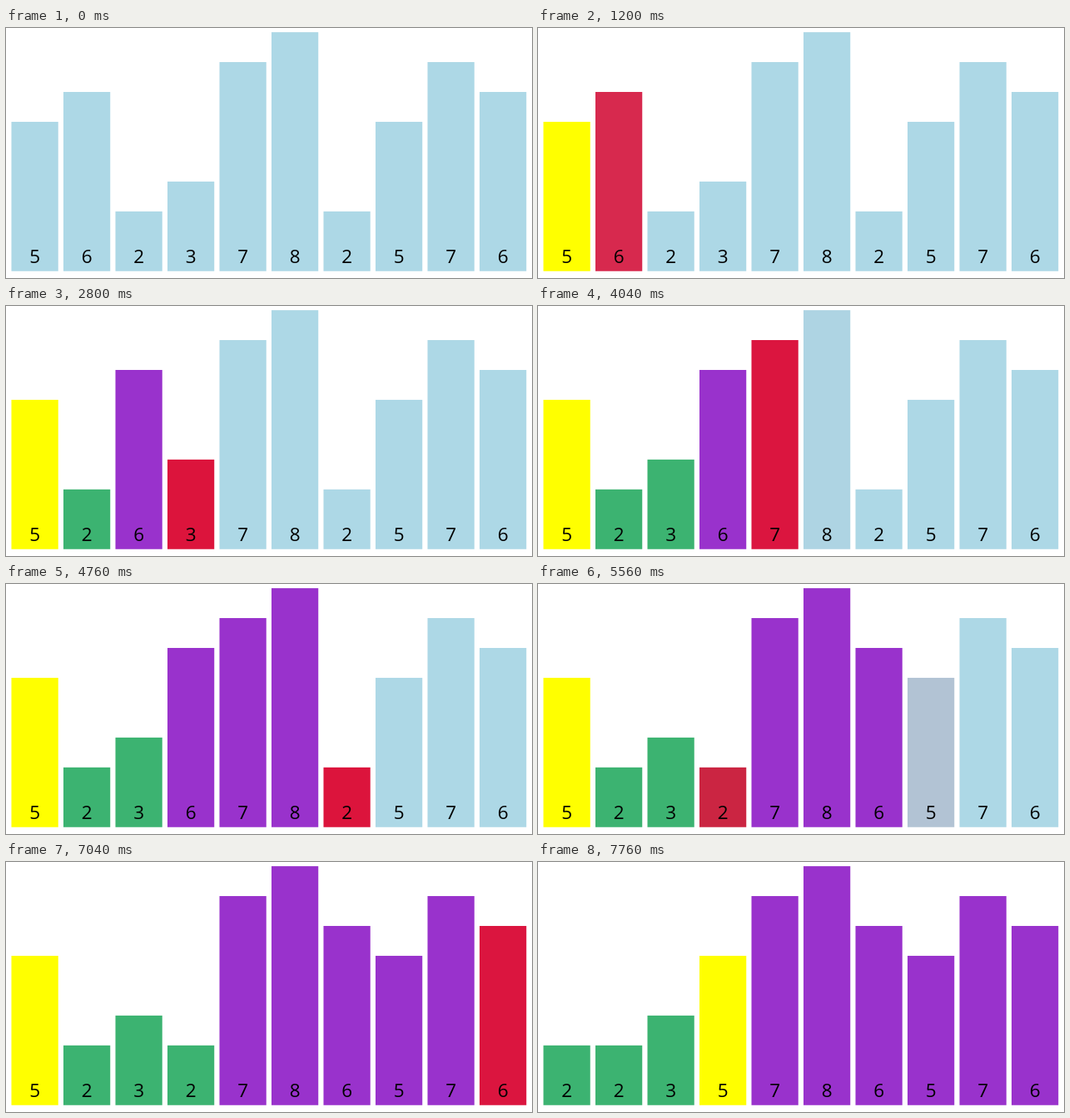
Recreate the animation shown at these times as an HTML page. Size 632 px wide and 301 px high, loop 8000 ms.

```html
<!DOCTYPE html>
<html lang="en">
<head>
<meta charset="utf-8">
<title>Quick sort partition</title>
<style>
  html, body { margin: 0; width: 100%; height: 100%; overflow: hidden; background: #fff; }
  svg { display: block; width: 632px; height: 301px; }
  text { font: 22.5px "Open Sans", "Noto Sans", sans-serif; text-anchor: middle; fill: #000; }
</style>
</head>
<body>
<svg viewBox="0 0 632 301"></svg>
<script>
const LOOP = 8000, TICK = 40, DURATION = 300;
const LEFT = 6.5, PITCH = 62.5, WIDTH = 56.25, BASE = 292.75, UNIT = 35.96;
const values = [5, 6, 2, 3, 7, 8, 2, 5, 7, 6];

const idle = [173, 216, 230];
const pivot = [255, 255, 0];
const current = [220, 20, 60];
const smaller = [60, 179, 113];
const larger = [153, 50, 204];

const paint = (...pairs) => ({ pairs });
const swap = (a, b) => ({ swap: [a, b] });

// [first visible tick, number of ticks, action]; bars are named by starting slot
const steps = [
  [560, 6, paint([0, pivot])],
  [1040, 7, paint([1, current])],
  [1560, 6, paint([1, larger], [2, current])],
  [2080, 6, swap(1, 2)],
  [2560, 7, paint([2, smaller], [3, current])],
  [3040, 7, swap(1, 3)],
  [3520, 7, paint([3, smaller], [4, current])],
  [4040, 7, paint([4, larger], [5, current])],
  [4560, 6, paint([5, larger], [6, current])],
  [5040, 7, swap(1, 6)],
  [5520, 7, paint([6, smaller], [7, current])],
  [6040, 7, paint([7, larger], [8, current])],
  [6520, 7, paint([8, larger], [9, current])],
  [7040, 7, paint([9, larger])],
  [7520, 7, swap(0, 6)]
];

const svg = document.querySelector("svg");

function add(parent, name, attrs) {
  const el = document.createElementNS("http://www.w3.org/2000/svg", name);
  for (const key in attrs) el.setAttribute(key, attrs[key]);
  return parent.appendChild(el);
}

const bars = values.map(value => {
  const group = add(svg, "g", {});
  const height = value * UNIT;
  const rect = add(group, "rect", { y: BASE - height, width: WIDTH, height });
  add(group, "text", { x: WIDTH / 2, y: 283 }).textContent = value;
  return { group, rect };
});

const mix = (a, b, p) => a + (b - a) * p;
const cubicInOut = t => t < 0.5 ? 4 * t ** 3 : 1 - 4 * (1 - t) ** 3;

function progress(now, first, count) {
  const span = (count - 1) * TICK;
  if (now < first) return 0;
  if (now >= first + span) return 1;
  const start = first + (span - TICK - DURATION) / 2;
  return cubicInOut((now - start) / DURATION);
}

function draw(now) {
  const slots = values.map((_, i) => i);
  const colors = values.map(() => idle);
  for (const [first, count, action] of steps) {
    const p = progress(now, first, count);
    if (!p) break;
    if (action.swap) {
      const [a, b] = action.swap;
      const from = slots[a], to = slots[b];
      slots[a] = mix(from, to, p);
      slots[b] = mix(to, from, p);
    } else {
      for (const [i, color] of action.pairs)
        colors[i] = colors[i].map((c, k) => mix(c, color[k], p));
    }
  }
  bars.forEach(({ group, rect }, i) => {
    group.setAttribute("transform", `translate(${LEFT + PITCH * slots[i]} 0)`);
    rect.setAttribute("fill", `rgb(${colors[i].map(Math.round)})`);
  });
}

const origin = performance.now();
function frame() {
  const time = (performance.now() - origin) % LOOP;
  draw(Math.floor(time / TICK) * TICK);
  requestAnimationFrame(frame);
}
frame();
</script>
</body>
</html>
```
